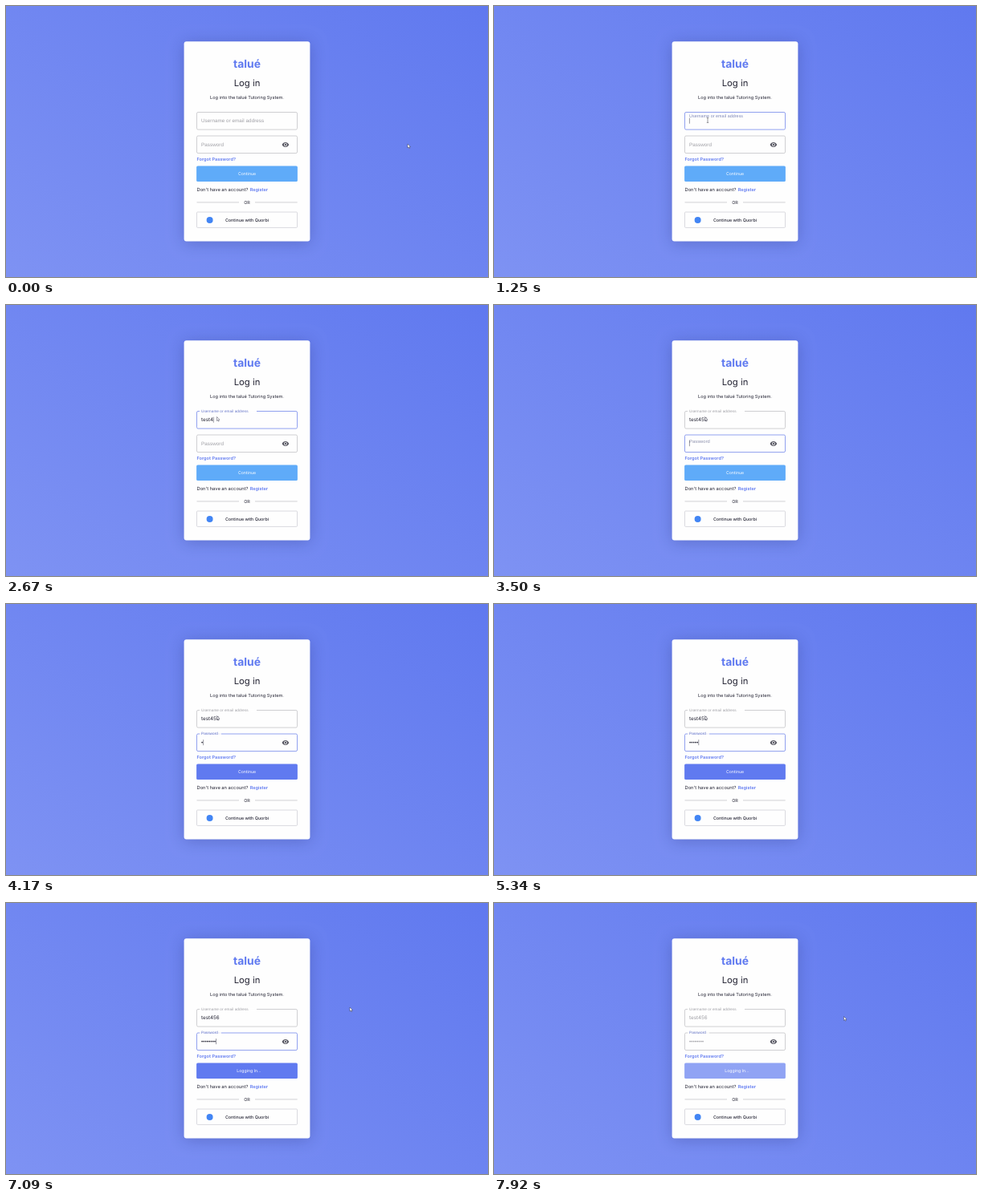
Animation of 600x338 px, one loop 8 s. Source, as an HTML page with a canvas:

```html
<!DOCTYPE html>
<html lang="en">
<head>
<meta charset="utf-8">
<title>Log in</title>
<style>
html, body { margin: 0; width: 100%; height: 100%; overflow: hidden; background: #7087f1; }
canvas { display: block; width: 100vw; height: 100vh; }
</style>
</head>
<body>
<canvas id="stage"></canvas>
<script>
const W = 600, H = 338, LOOP = 8000;
const canvas = document.getElementById('stage');
const ctx = canvas.getContext('2d');

const SANS = 'Inter, sans-serif';
const FIELD = '"Liberation Sans", Arial, sans-serif';
const BLUE = [96, 122, 240], SKY = [95, 171, 249], FADED = [144, 163, 244];
const GREY = [158, 158, 164], INK = [34, 34, 50];

const FOCUS_USER = 1203, FOCUS_PASS = 3480;
const SUBMIT = 7050, DISABLE = 7130;
const USER = { text: 'test456', start: 1750, step: 210 };
const PASS = { text: '••••••••', start: 3950, step: 285 };

// Pointer stops: time, x, y
const STOPS = [
  [0, 500, 172], [100, 500, 172], [900, 266, 142.5], [1350, 266, 142.5],
  [1500, 262.5, 139.5], [6690, 262.5, 139.5], [7090, 428, 130], [7340, 435.5, 141.5],
  [LOOP, 435.5, 141.5]
];

const clamp = v => Math.min(1, Math.max(0, v));
const mix = (a, b, p) => a + (b - a) * p;
const span = (t, start, len) => clamp((t - start) / len);
const easeOut = p => 1 - (1 - p) ** 3;
const smooth = p => p * p * (3 - 2 * p);
const rgb = c => `rgb(${c.map(Math.round).join(',')})`;
const mixColor = (a, b, p) => a.map((v, i) => mix(v, b[i], p));

function text(str, x, y, size, color, opt = {}) {
  ctx.font = `${opt.weight || 400} ${size}px ${opt.family || SANS}`;
  ctx.letterSpacing = (opt.spacing || 0) + 'px';
  ctx.textAlign = opt.align || 'left';
  ctx.fillStyle = color;
  ctx.fillText(str, x, y);
  return ctx.measureText(str).width;
}

function box(x, y, w, h, r, fill, stroke, line) {
  ctx.beginPath();
  ctx.roundRect(x, y, w, h, r);
  if (fill) { ctx.fillStyle = fill; ctx.fill(); }
  if (stroke) { ctx.strokeStyle = stroke; ctx.lineWidth = line; ctx.stroke(); }
}

function rule(x1, y1, x2, y2, color, width) {
  ctx.beginPath();
  ctx.moveTo(x1, y1);
  ctx.lineTo(x2, y2);
  ctx.strokeStyle = color;
  ctx.lineWidth = width;
  ctx.stroke();
}

function background() {
  const g = ctx.createLinearGradient(478.2, -85.3, 121.8, 423.3);
  g.addColorStop(0, '#6079ef');
  g.addColorStop(1, '#7e92f3');
  ctx.fillStyle = g;
  ctx.fillRect(0, 0, W, H);
}

function card(scale) {
  ctx.save();
  ctx.shadowColor = 'rgba(30,40,110,0.29)';
  ctx.shadowBlur = 19 * scale;
  ctx.shadowOffsetY = 2 * scale;
  box(221.6, 44.2, 156.8, 249.3, 3, '#fefefe');
  ctx.restore();
}

function eye(x, y) {
  ctx.fillStyle = '#555560';
  ctx.beginPath();
  ctx.moveTo(x - 4.3, y);
  ctx.bezierCurveTo(x - 2.7, y - 3.9, x + 2.7, y - 3.9, x + 4.3, y);
  ctx.bezierCurveTo(x + 2.7, y + 3.9, x - 2.7, y + 3.9, x - 4.3, y);
  ctx.moveTo(x + 1.95, y);
  ctx.arc(x, y, 1.95, 0, Math.PI * 2);
  ctx.moveTo(x + 1.15, y);
  ctx.arc(x, y, 1.15, 0, Math.PI * 2);
  ctx.fill('evenodd');
}

const typedCount = (entry, t) =>
  t < entry.start ? 0 : Math.min(entry.text.length, Math.floor((t - entry.start) / entry.step) + 1);

function caretOn(t, focusAt, entry, count) {
  const last = count ? entry.start + (count - 1) * entry.step : focusAt;
  return (t - last) % 1060 < 530;
}

function field(t, top, label, focusAt, blurAt, entry, notchEnd) {
  const focused = t >= focusAt && t < blurAt;
  box(237.5, top, 125, 21.6, 1.6, '#fefefe', focused ? '#6c82ea' : '#bfbfc3', 0.75);

  const open = span(t, focusAt + 50, 100);
  if (open > 0) rule(241, top, mix(241, notchEnd, open), top, '#fefefe', 1.6);

  const lift = easeOut(span(t, focusAt, 200));
  const size = mix(6.25, 4.69, lift);
  const tint = label === 'Password' || focused ? lift : 0;
  text(label, 243, mix(top + 12.9, top + 1.4, lift), size,
    rgb(mixColor(GREY, [100, 116, 200], tint)), { family: FIELD, spacing: size * 0.0094 });

  const count = typedCount(entry, t);
  const ink = rgb(t >= DISABLE ? GREY : INK);
  let width = 0;
  if (entry === PASS) {
    ctx.fillStyle = ink;
    for (let i = 0; i < count; i++) {
      ctx.beginPath();
      ctx.arc(244.1 + i * 2.27, top + 10.6, 0.85, 0, Math.PI * 2);
      ctx.fill();
    }
    width = count * 2.27;
  } else if (count) {
    width = text(entry.text.slice(0, count), 243, top + 12.9, 6.25, ink);
  }
  if (focused && caretOn(t, focusAt, entry, count)) {
    const x = 243.4 + width;
    rule(x, top + 7.2, x, top + 14.2, '#333344', 0.5);
  }
}

function button(t) {
  const ready = smooth(span(t, PASS.start - 60, 250));
  const off = smooth(span(t, DISABLE, 250));
  const fill = mixColor(mixColor(SKY, BLUE, ready), FADED, off);
  box(237.1, 199.5, 125.8, 19.6, 1.6, rgb(fill));
  const busy = t >= SUBMIT;
  text(busy ? 'Logging In...' : 'Continue', busy ? 302.4 : 300, 211.1, 5.2, '#ffffff', { align: 'center' });
}

function pointerAt(t) {
  const i = STOPS.findIndex(s => s[0] > t);
  const [t0, x0, y0] = STOPS[i - 1], [t1, x1, y1] = STOPS[i];
  const p = smooth(span(t, t0, t1 - t0));
  return [mix(x0, x1, p), mix(y0, y1, p)];
}

function beam(x, y) {
  ctx.beginPath();
  for (const s of [-1, 1]) {
    ctx.moveTo(x - 1.2, y + s * 2.9);
    ctx.lineTo(x + 1.2, y + s * 2.9);
  }
  ctx.moveTo(x, y - 2.9);
  ctx.lineTo(x, y + 2.9);
  ctx.strokeStyle = '#444450';
  ctx.lineWidth = 0.55;
  ctx.stroke();
}

function arrow(x, y) {
  const shape = [[0, 0], [0, 5], [1.15, 4], [1.9, 5.7], [2.7, 5.3], [1.95, 3.7], [3.5, 3.6]];
  ctx.beginPath();
  shape.forEach(([dx, dy]) => ctx.lineTo(x + dx, y + dy));
  ctx.closePath();
  ctx.fillStyle = '#ffffff';
  ctx.fill();
  ctx.strokeStyle = '#333344';
  ctx.lineWidth = 0.45;
  ctx.stroke();
}

function pointer(t) {
  const [x, y] = pointerAt(t);
  const overField = t < 1480 && x > 238 && x < 340 && y > 132 && y < 184;
  (overField ? beam : arrow)(x, y);
}

function draw(t, scale) {
  background();
  card(scale);
  const center = { align: 'center' };
  const ink = rgb(INK), blue = rgb(BLUE);

  text('talué', 300, 77, 13.9, blue, { align: 'center', weight: 700 });
  text('Log in', 300, 100.4, 11.3, ink, center);
  text('Log into the talué Tutoring System.', 300, 116.1, 5.58, ink, center);

  field(t, 132.5, 'Username or email address', FOCUS_USER, FOCUS_PASS, USER, 312);
  field(t, 162, 'Password', FOCUS_PASS, DISABLE, PASS, 268);
  eye(347.9, 172.9);

  text('Forgot Password?', 237.5, 193.1, 5.6, blue, { weight: 600 });
  button(t);
  text("Don't have an account?", 237.5, 231, 5.75, ink);
  text('Register', 303.7, 231, 5.6, blue, { weight: 600 });

  rule(237.5, 244.9, 290, 244.9, '#a4a4ac', 0.5);
  rule(310, 244.9, 362.7, 244.9, '#a4a4ac', 0.5);
  text('OR', 300, 247, 5.4, ink, center);

  box(237.5, 257, 125, 19.4, 1, '#fefefe', '#c2c2ca', 0.6);
  ctx.beginPath();
  ctx.arc(253.6, 267, 4, 0, Math.PI * 2);
  ctx.fillStyle = '#4285f4';
  ctx.fill();
  text('Continue with Quorbi', 300, 268.6, 5.35, ink, { align: 'center', weight: 500 });

  pointer(t);
}

const begin = performance.now();

function frame() {
  const dpr = window.devicePixelRatio || 1;
  const w = Math.round(innerWidth * dpr), h = Math.round(innerHeight * dpr);
  if (canvas.width !== w || canvas.height !== h) {
    canvas.width = w;
    canvas.height = h;
  }
  ctx.setTransform(w / W, 0, 0, h / H, 0, 0);
  ctx.textRendering = 'geometricPrecision';
  draw((performance.now() - begin) % LOOP, w / W);
  requestAnimationFrame(frame);
}
frame();
</script>
</body>
</html>
```
